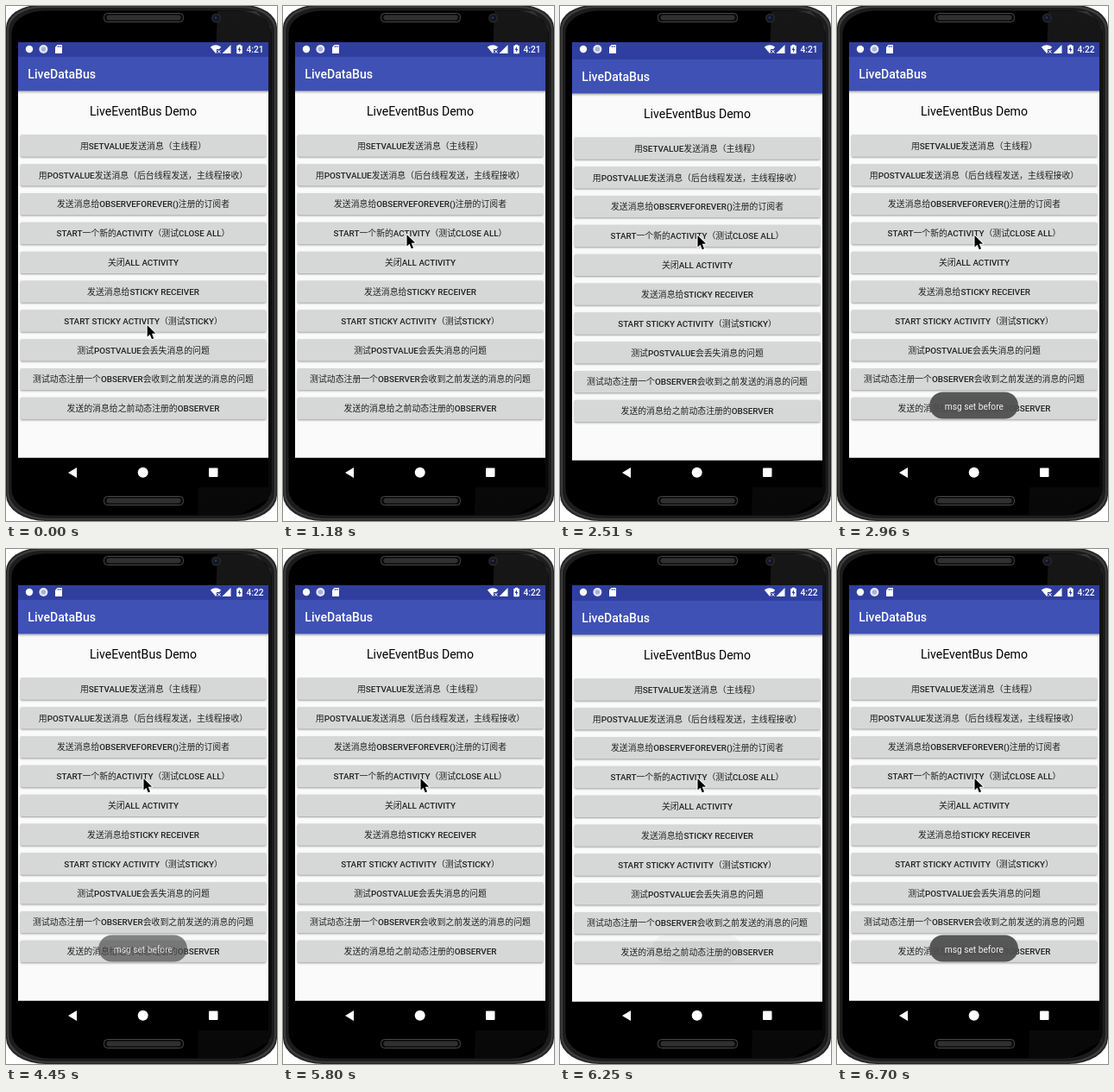
These frames come from a looping animation (314 px wide and 597 px high, 8000 ms). An HTML page with a canvas:

```html
<!DOCTYPE html>
<html lang="zh-CN">
<head>
<meta charset="utf-8">
<title>LiveEventBus Demo</title>
<style>
html, body { margin: 0; width: 100%; height: 100%; overflow: hidden; background: #fff; }
canvas { display: block; width: 314px; height: 597px; }
</style>
</head>
<body>
<canvas id="stage"></canvas>
<script>
const W = 314, H = 597, LOOP = 8000;
const DP = 290 / 411.4;
const SCREEN = { x: 14, y: 42, w: 290, h: 683.4 * DP };
const BAR_END = SCREEN.y + 80 * DP;
const FONT = 'Roboto, "Noto Sans CJK SC", "Noto Sans CJK", sans-serif';
const LABELS = [
  '用SETVALUE发送消息（主线程）',
  '用POSTVALUE发送消息（后台线程发送，主线程接收）',
  '发送消息给OBSERVEFOREVER()注册的订阅者',
  'START一个新的ACTIVITY（测试CLOSE ALL）',
  '关闭ALL ACTIVITY',
  '发送消息给STICKY RECEIVER',
  'START STICKY ACTIVITY（测试STICKY）',
  '测试POSTVALUE会丢失消息的问题',
  '测试动态注册一个OBSERVER会收到之前发送的消息的问题',
  '发送的消息给之前动态注册的OBSERVER'
];

const dpr = window.devicePixelRatio || 1;

function setup(canvas) {
  canvas.width = Math.round(W * dpr);
  canvas.height = Math.round(H * dpr);
  const c = canvas.getContext('2d');
  c.scale(dpr, dpr);
  return c;
}

function layer(paint) {
  const canvas = document.createElement('canvas');
  paint(setup(canvas));
  return canvas;
}

const ctx = setup(document.getElementById('stage'));

function rect(c, x, y, w, h, color) {
  c.fillStyle = color;
  c.fillRect(x, y, w, h);
}

function round(c, x, y, w, h, r, fill, stroke, line = 1) {
  c.beginPath();
  c.roundRect(x, y, w, h, r);
  if (fill) { c.fillStyle = fill; c.fill(); }
  if (stroke) { c.strokeStyle = stroke; c.lineWidth = line; c.stroke(); }
}

function disc(c, x, y, r, color) {
  c.fillStyle = color;
  c.beginPath();
  c.arc(x, y, r, 0, Math.PI * 2);
  c.fill();
}

function poly(c, points, color) {
  c.fillStyle = color;
  c.beginPath();
  points.forEach(([x, y]) => c.lineTo(x, y));
  c.closePath();
  c.fill();
}

function text(c, str, x, y, size, weight, color, align = 'center') {
  c.font = `${weight} ${size}px ${FONT}`;
  c.textAlign = align;
  c.fillStyle = color;
  c.fillText(str, x, y);
}

const clamp = v => Math.min(1, Math.max(0, v));
const smooth = v => { v = clamp(v); return v * v * (3 - 2 * v); };

// Number of hard steps taken by time t, of n spread evenly from start to end
function stepsAt(t, start, end, n) {
  if (t < start) return 0;
  return Math.min(n, Math.floor((t - start) / (end - start) * (n - 1) + 1e-6) + 1);
}

function speaker(c, y) {
  round(c, 113.5, y, 92, 10, 4, '#0a0a0a', '#484848');
  round(c, 116.5, y + 2, 86, 6, 3, '#303030');
}

// Phone outline, with flatter corners than a circle
function shell(c, inset, fill) {
  const top = { x: 38, y: 26 }, bottom = { x: 46, y: 30 };
  round(c, inset, inset - 1, W - 2 * inset, H + 1 - 2 * inset, [top, top, bottom, bottom], fill);
}

function paintPhone(c) {
  rect(c, 0, 0, W, H, '#fff');
  shell(c, 0, '#262626');
  shell(c, 1.5, '#404040');
  shell(c, 3, '#1c1c1c');
  shell(c, 6.5, '#000');

  c.save();
  c.beginPath();
  c.rect(7, 6, 300, 584);
  c.clip();
  const glare = c.createLinearGradient(0, 0, 0, H);
  glare.addColorStop(0, 'rgba(255,255,255,0.09)');
  glare.addColorStop(1, 'rgba(255,255,255,0.03)');
  c.globalCompositeOperation = 'lighter';
  poly(c, [[245, 6], [290, 6], [307, 24], [307, 570], [270, 590], [222, 590]], glare);
  c.restore();

  speaker(c, 8.5);
  speaker(c, 568.5);
  disc(c, 243.5, 14, 5.5, '#252528');
  disc(c, 243.5, 14, 3.6, '#111422');
  disc(c, 243, 13.5, 1.5, '#2b3350');

  rect(c, SCREEN.x, SCREEN.y, SCREEN.w, 516, '#000');
  poly(c, [[72, 541], [82, 535], [82, 547]], '#fff');
  disc(c, 158.7, 540.8, 6, '#fff');
  round(c, 235, 535.5, 10.5, 10.5, 1, '#fff');
}

function paintWindow(c) {
  const { x, y, w, h } = SCREEN;
  rect(c, x, y, w, h, '#fafafa');

  const shade = c.createLinearGradient(0, BAR_END, 0, BAR_END + 3.5);
  shade.addColorStop(0, 'rgba(0,0,0,0.28)');
  shade.addColorStop(1, 'rgba(0,0,0,0)');
  rect(c, x, 98, w, 4, shade);
  rect(c, x, 58, w, BAR_END - 58, '#3f51b5');
  rect(c, x, y, w, 24 * DP, '#303f9f');

  text(c, 'LiveDataBus', x + 16 * DP, 84, 20 * DP, 500, '#fff', 'left');
  text(c, 'LiveEventBus Demo', 159, 127, 20 * DP, 400, '#000');

  LABELS.forEach((label, i) => {
    const top = 149.3 + i * 48 * DP;
    c.save();
    c.shadowColor = 'rgba(0,0,0,0.38)';
    c.shadowBlur = 2 * dpr;
    c.shadowOffsetY = dpr;
    round(c, 16.8, top, 284.4, 36 * DP, 2 * DP, '#d6d7d7');
    c.restore();
    text(c, label, 159, Math.round(top + 16.4), 14 * DP, 500, '#212121');
  });
}

function paintToast(c) {
  c.globalAlpha = 0.94;
  round(c, 107.3, 447.5, 102.6, 31, 15.5, '#4e4e4e');
  c.globalAlpha = 1;
  text(c, 'msg set before', 158.8, 467.5, 10.2, 400, '#f0f0f0');
}

function paintIcons(c) {
  disc(c, 27, 50, 4.2, '#fff');
  disc(c, 43.4, 50, 5, '#e4e7f5');
  disc(c, 43.4, 50, 2.7, '#a9b1da');

  // memory card
  poly(c, [[59.5, 45], [65, 45], [65, 55], [57, 55], [57, 47.7]], '#fff');
  for (let i = 0; i < 3; i++) rect(c, 59.6 + i * 1.7, 46, 0.8, 2, '#303f9f');

  // wireless fan with a cross
  c.fillStyle = '#fff';
  c.beginPath();
  c.moveTo(243, 55);
  c.lineTo(236.8, 47.5);
  c.quadraticCurveTo(243, 43.2, 249.2, 47.5);
  c.closePath();
  c.fill();
  rect(c, 244, 50, 5, 5.5, '#303f9f');
  c.strokeStyle = '#fff';
  c.lineWidth = 1;
  c.beginPath();
  c.moveTo(245, 51); c.lineTo(248.5, 54.7);
  c.moveTo(248.5, 51); c.lineTo(245, 54.7);
  c.stroke();

  poly(c, [[250.5, 55], [260.5, 45], [260.5, 55]], '#fff');

  // charging battery
  rect(c, 269, 44.8, 3, 1.5, '#fff');
  round(c, 267.2, 45.7, 6.6, 9.6, 0.8, '#fff');
  poly(c, [[271, 47], [268.6, 51], [270.2, 51], [270, 54], [272.4, 50], [271, 50]], '#303f9f');
}

let phone, screen, toast, icons;
function build() {
  phone = layer(paintPhone);
  screen = layer(paintWindow);
  toast = layer(paintToast);
  icons = layer(paintIcons);
}

function put(image, alpha = 1, dy = 0) {
  if (alpha <= 0) return;
  ctx.globalAlpha = alpha;
  ctx.drawImage(image, 0, dy, W, H);
  ctx.globalAlpha = 1;
}

// New window slides up and fades in; age in ms
function openWindow(age) {
  const shift = Math.floor(42 * Math.pow(1 - clamp(age / 350), 5));
  put(screen, 1 - Math.pow(1 - clamp(age / 200), 4), shift);
}

function toastAlpha(t, first, second) {
  if (t >= 6100) return smooth((second - 0.6) / 3);
  if (t >= 4450) return 1 - smooth(stepsAt(t, 4450, 4750, 3) / 3);
  return smooth((first - 1) / 3);
}

function pointerAt(t) {
  if (t < 1320) {
    const p = smooth(stepsAt(t, 150, 1180, 8) / 8), q = 1 - p;
    return [q * q * 163.7 + 2 * p * q * 122 + p * p * 143.5, 265 + 105 * q * q];
  }
  const p = stepsAt(t, 1320, 1770, 4) / 4;
  return [143.5 + 16 * smooth(p), 265 + p + 2 * Math.sin(Math.PI * p)];
}

function drawPointer([x, y]) {
  ctx.save();
  ctx.translate(x, y);
  ctx.beginPath();
  [[0, 0], [0, 13.5], [3, 10.7], [5.3, 16.2], [7.5, 15.3], [5.3, 9.8], [9.6, 9.6]]
    .forEach(([px, py]) => ctx.lineTo(px, py));
  ctx.closePath();
  ctx.lineJoin = 'round';
  ctx.lineWidth = 2;
  ctx.strokeStyle = '#fff';
  ctx.stroke();
  ctx.fillStyle = '#000';
  ctx.fill();
  ctx.restore();
}

function draw(t) {
  const first = stepsAt(t, 2360, 2960, 5) - 1;
  const second = stepsAt(t, 6100, 6700, 5) - 1;
  put(phone);
  put(screen);
  if (first >= 0 && first < 4) openWindow(143 * first);
  if (second >= 0 && second < 4) openWindow(51 + 119 * second);
  put(icons);
  text(ctx, t < 2660 ? '4:21' : '4:22', 278.5, 54, 10.2, 500, '#fff', 'left');
  put(toast, toastAlpha(t, first, second));
  drawPointer(pointerAt(t));
}

build();
document.fonts.ready.then(build);

const began = performance.now();
function tick() {
  draw((performance.now() - began) % LOOP);
  requestAnimationFrame(tick);
}
tick();
</script>
</body>
</html>
```
